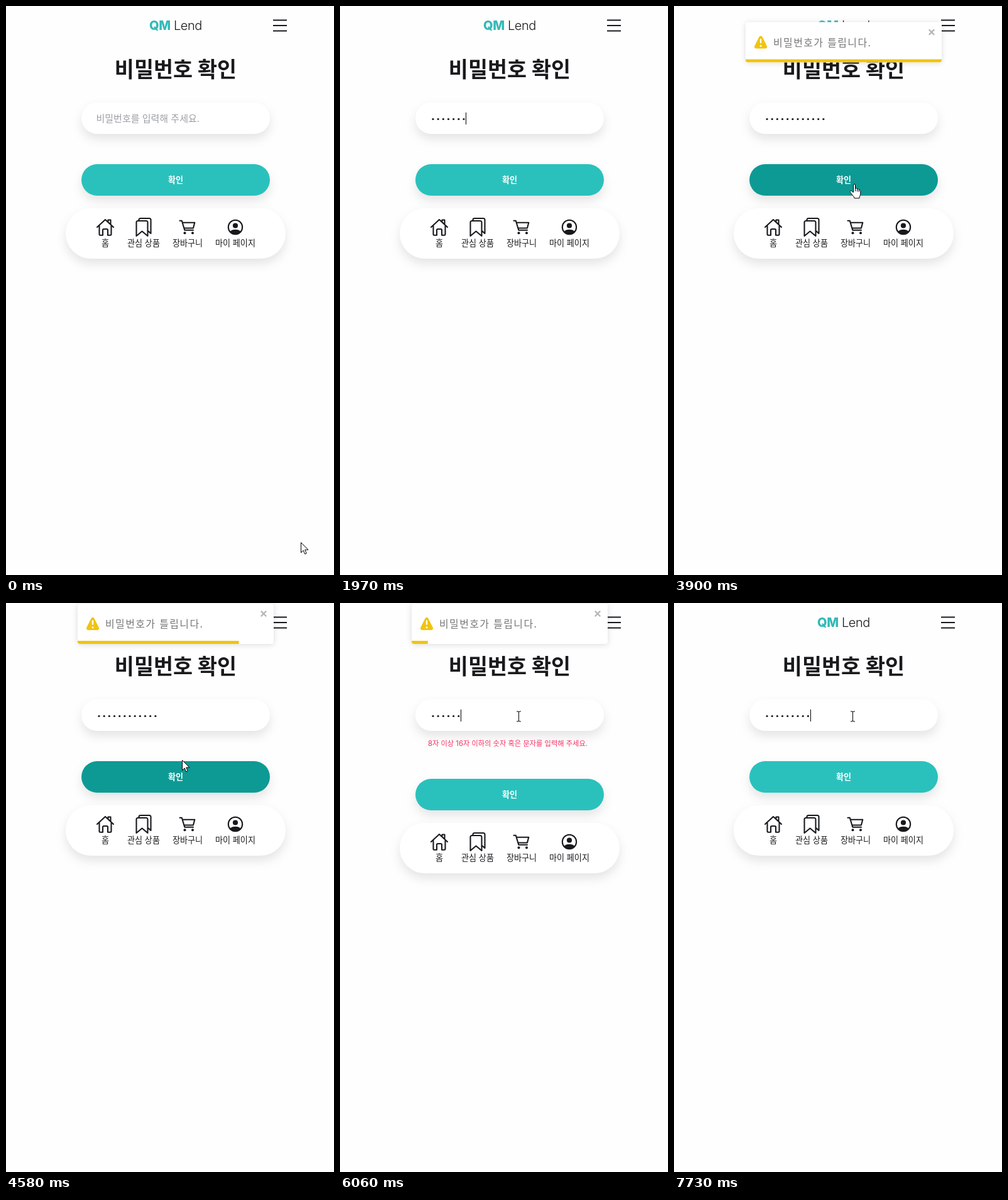
Write an HTML page that moves like this. It is 522x903 px and loops after 8000 ms.

```html
<!DOCTYPE html>
<html lang="ko">
<head>
<meta charset="utf-8">
<title>비밀번호 확인</title>
<style>
  html, body { margin: 0; width: 100%; height: 100%; overflow: hidden; background: #fefefe; }
  svg { display: block; width: 522px; height: 903px; }
  text { font-family: Inter, "Noto Sans CJK KR", "Noto Sans CJK JP", sans-serif; fill: #181a1c; }
  .mid { text-anchor: middle; }
  .pill { fill: #fff; filter: drop-shadow(0 8px 8px rgba(0, 0, 0, .1)); }
  .icon { fill: none; stroke: #17191c; stroke-width: 2.1; stroke-linecap: round; stroke-linejoin: round; }
  .solid { fill: #17191c; stroke: none; }
  .label { font-size: 13.1px; }
  .card { fill: #fff; filter: drop-shadow(0 1px 5px rgba(0, 0, 0, .14)); }
  .pointer { fill: #fff; stroke: #000; stroke-width: 1; stroke-linejoin: round; }
  #toast text { font-family: "Noto Sans CJK KR", "Noto Sans CJK JP", sans-serif; font-size: 16px; letter-spacing: 1.35px; fill: #777; }
</style>
</head>
<body>
<svg viewBox="0 0 522 903">
  <text class="mid" x="270" y="38" font-weight="300" style="font-size:20px;letter-spacing:-.02em"><tspan font-weight="800" style="fill:#33b9b7">QM</tspan> Lend</text>
  <path d="M425 22.5h22M425 31h22M425 39.5h22" stroke="#17191c" stroke-width="2"/>
  <text class="mid" x="270" y="113.3" font-size="33.75" font-weight="700">비밀번호 확인</text>

  <rect class="pill" x="120" y="153" width="300" height="50" rx="25"/>
  <text id="hint" x="143.5" y="183.7" font-size="15" style="fill:#9b9fa6">비밀번호를 입력해 주세요.</text>
  <g id="dots" fill="#17191c"></g>
  <rect id="caret" y="169" width="1" height="19" fill="#000"/>
  <text id="error" x="140" y="227.2" font-size="11.25" style="fill:#fb2f62">8자 이상 16자 이하의 숫자 혹은 문자를 입력해 주세요.</text>

  <g id="lower">
    <rect id="button" class="pill" x="120" y="251" width="300" height="50" rx="25"/>
    <text class="label mid" x="270" y="281" font-weight="700" style="fill:#fff">확인</text>
    <rect class="pill" x="95" y="321" width="350" height="80" rx="40"/>
    <g class="icon">
      <path d="M145 351L158 339L171 351M162.5 342.5V339.5H166.5V346.5M148.5 349V362Q148.5 363.7 150 363.7H154V355.5Q154 354 155.5 354H160.5Q162 354 162 355.5V363.7H166Q167.5 363.7 167.5 362V349"/>
      <path d="M207.5 365V343.5Q207.5 341 210 341H223Q225.5 341 225.5 343.5V365L216.5 357.5ZM211.5 340.5V339.5Q211.5 337 214 337H228Q230.5 337 230.5 339.5V361L226 357"/>
      <path d="M276.5 340.8H279.8L284.3 355.8H298M280.8 343.8H300.3L298 352.5H283.3"/>
      <circle class="solid" cx="284.5" cy="360.3" r="2"/>
      <circle class="solid" cx="297" cy="360.3" r="2"/>
      <circle cx="365" cy="351" r="11.2"/>
      <circle class="solid" cx="365" cy="348.5" r="4.1"/>
      <path class="solid" d="M356.5 358C359 353.5 371 353.5 373.5 358Q370 362.5 365 362.5T356.5 358Z"/>
    </g>
    <g class="label mid" font-weight="300">
      <text x="158" y="381">홈</text>
      <text x="219" y="381">관심 상품</text>
      <text x="289" y="381">장바구니</text>
      <text x="365" y="381">마이 페이지</text>
    </g>
  </g>

  <g id="toast">
    <clipPath id="round"><rect x="114" y="1" width="312" height="64" rx="4"/></clipPath>
    <rect class="card" x="114" y="1" width="312" height="64" rx="4"/>
    <rect id="bar" x="114" y="60" width="312" height="5" fill="#f1c40f" clip-path="url(#round)"/>
    <path d="M138 26L145 40H131Z" fill="#f1c40f" stroke="#f1c40f" stroke-width="6" stroke-linejoin="round"/>
    <path d="M138 28.5V33.5" stroke="#fff" stroke-width="2.4" stroke-linecap="round"/>
    <circle cx="138" cy="38.7" r="1.5" fill="#fff"/>
    <text x="158" y="39">비밀번호가 틀립니다.</text>
    <path d="M405.8 12.8l8.4 8.4m0-8.4l-8.4 8.4" stroke="#b4b4b4" stroke-width="2.3"/>
  </g>

  <g id="arrow"><path class="pointer" d="M.5.5V16.5L4.2 13L6.7 18.8L9.2 17.7L6.7 12H12Z"/></g>
  <g id="hand">
    <g transform="translate(-6.5 0)">
      <path class="pointer" d="M6 1.9C6 .3 9 .3 9 1.9V8C9 6.8 12 7 12 8.4V9C12 7.9 14.7 8.2 14.7 9.6V10.4C14.7 9.4 17.3 9.6 17.3 11.4V16C17.3 18.5 15.5 20 15.5 23H7.5C7.5 20.5 4 18 2.5 15.5C1.5 14 .3 12.8 .8 11.9C1.6 10.6 3.6 11.4 6 14Z"/>
      <path d="M6 12V14M9 8V12M12 9V12.5M14.7 10V13" stroke="#000"/>
    </g>
  </g>
  <g id="beam"><path d="M-3-8H-1L.5-7L2-8H4M.5-7V7M-3 8H-1L.5 7L2 8H4" fill="none" stroke="#111" stroke-width="1.1"/></g>
</svg>
<script>
const LOOP = 8000;
const $ = id => document.getElementById(id);
const show = (el, on) => el.style.display = on ? '' : 'none';

const SLOTS = 12, PITCH = 8.17;
const dots = Array.from({ length: SLOTS }, (_, i) => {
  const dot = document.createElementNS('http://www.w3.org/2000/svg', 'circle');
  dot.setAttribute('cx', 148 + i * PITCH);
  dot.setAttribute('cy', 179.5);
  dot.setAttribute('r', 1.6);
  return $('dots').appendChild(dot);
});

// Times of the key presses.
const typed = [1250, 1310, 1380, 1580, 1640, 1700, 1910, 1980, 2040, 2240, 2310, 2370,
  6940, 7010, 7080, 7270, 7340, 7420, 7510, 7610, 7720];
const deleted = Array.from({ length: SLOTS }, (_, i) => 5500 + i * 107);
const before = (list, t) => list.filter(k => k <= t).length;
const countAt = t => before(typed, t) - before(deleted, t);

const caretSpans = [[600, 1120], [1250, 2910], [5000, LOOP]];

// Pointer hot spot: time, x, y.
const path = [
  [0, 469, 851], [70, 469, 851], [560, 248, 174], [640, 237, 177], [2910, 237, 177],
  [2985, 246, 253], [3050, 248.5, 255], [3100, 249.5, 253], [3240, 249.5, 253], [3370, 255.5, 264],
  [3700, 255.5, 264], [3860, 285.5, 282], [4510, 285.5, 282], [4580, 279.5, 249],
  [4640, 279.5, 249], [4780, 284, 176], [4850, 284, 180], [LOOP, 284, 180]
];
function pointerAt(t) {
  const i = Math.max(1, path.findIndex(p => p[0] >= t));
  const [t0, x0, y0] = path[i - 1], [t1, x1, y1] = path[i];
  const p = Math.min(1, Math.max(0, (t - t0) / (t1 - t0)));
  const e = p * p * (3 - 2 * p);
  return [x0 + (x1 - x0) * e, y0 + (y1 - y0) * e];
}
const inside = ([x, y], top) => x >= 120 && x <= 420 && y >= top && y <= top + 50;

// Toast drops in with a bounce and leaves upwards: time, offset, opacity, easing.
const OUT = 'cubic-bezier(.215,.61,.355,1)';
const toast = $('toast').animate([
  [0, -3000, 0, 'linear'], [3490, -3000, 0, OUT], [3910, 25, 1, OUT], [4015, -10, 1, OUT],
  [4120, 5, 1, OUT], [4190, 0, 1, 'linear'], [6226, 0, 1, 'ease'], [6366, -10, 1, 'ease'],
  [6506, 20, 1, 'ease'], [6541, 20, 1, 'ease'], [6926, -2000, 0, 'linear'], [LOOP, -2000, 0, 'linear']
].map(([t, y, opacity, easing]) => ({ offset: t / LOOP, transform: `translateY(${y}px)`, opacity, easing })),
  { duration: LOOP, fill: 'both' });
toast.pause();

const BAR_START = 4226, BAR_TIME = 2000;

function draw(t) {
  const count = countAt(t);
  dots.forEach((dot, i) => show(dot, i < count));
  show($('hint'), count === 0);
  show($('caret'), caretSpans.some(([a, b]) => t >= a && t < b));
  $('caret').setAttribute('x', count ? Math.floor(143.6 + count * PITCH) : 144);

  const invalid = t > deleted[0] && count < 8;
  show($('error'), invalid);
  $('lower').setAttribute('transform', `translate(0 ${invalid ? 28 : 0})`);

  toast.currentTime = t;
  const left = 1 - Math.min(1, Math.max(0, (t - BAR_START) / BAR_TIME));
  $('bar').setAttribute('width', 312 * left);

  const pos = pointerAt(t);
  const kind = inside(pos, 251) ? 'hand' : inside(pos, 153) ? 'beam' : 'arrow';
  const hidden = t >= typed[0] && t < 2910;
  for (const id of ['arrow', 'hand', 'beam']) {
    show($(id), id === kind && !hidden);
    $(id).setAttribute('transform', `translate(${pos.map(Math.round).join(' ')})`);
  }
  const hover = inside(pointerAt(Math.max(0, t - 60)), 251);
  $('button').style.fill = hover ? '#0d9a94' : '#2ac1bc';
}

const start = performance.now();
function tick() {
  draw((performance.now() - start) % LOOP);
  requestAnimationFrame(tick);
}
tick();
</script>
</body>
</html>
```
